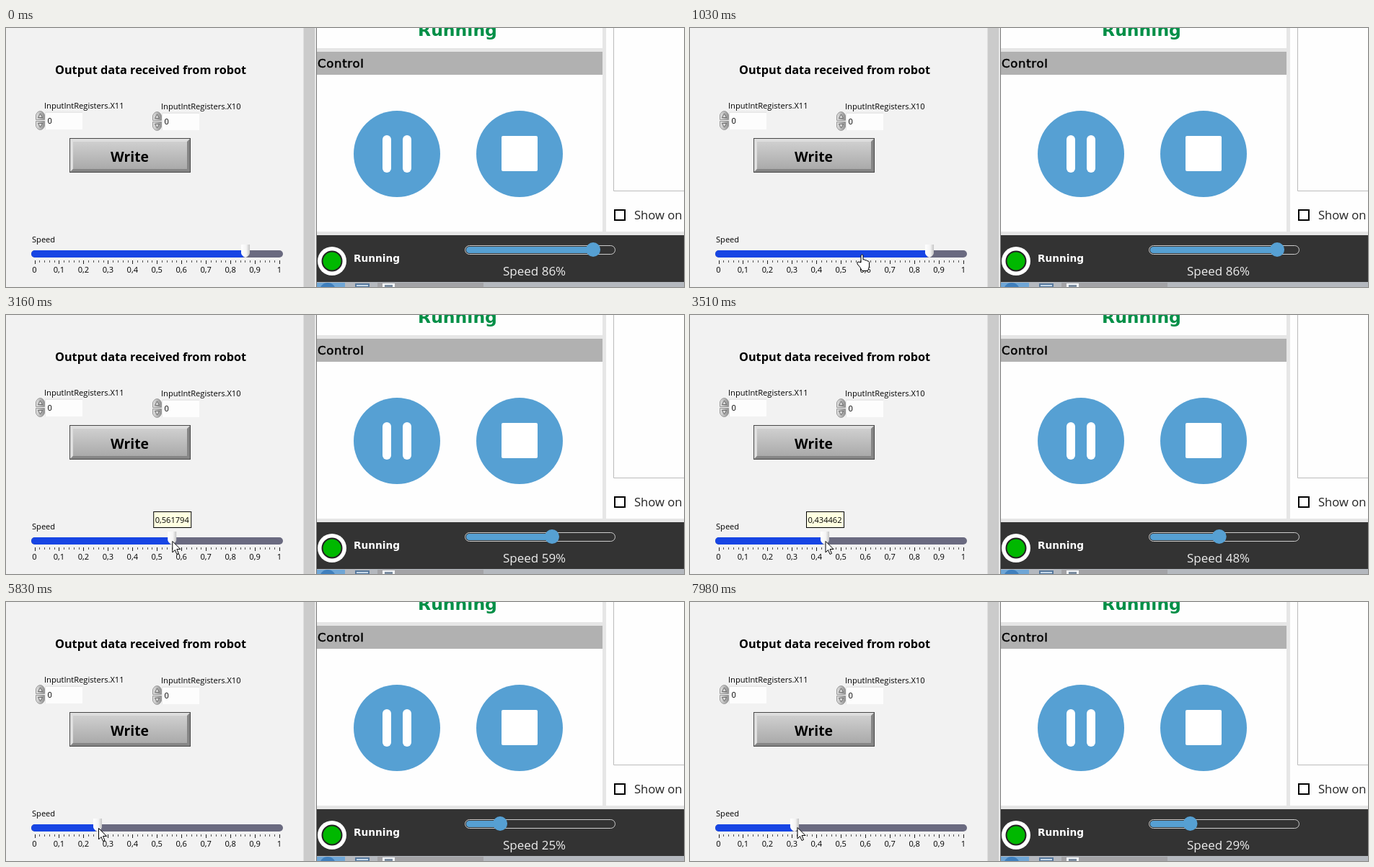
An HTML page for the animation above (8000 ms loop, 940 px wide and 360 px high).

```html
<!DOCTYPE html>
<html lang="en">
<head>
<meta charset="utf-8">
<title>Speed slider</title>
<style>
html, body { margin: 0; width: 100%; height: 100%; overflow: hidden; background: #f2f2f2; }
svg { display: block; }
text { font-family: "Open Sans", "Noto Sans", sans-serif; white-space: pre; }
.s { font-size: 11.1px; }
.b { font-weight: 700; }
.d { font-family: "DejaVu Sans", sans-serif; }
.m { text-anchor: middle; }
</style>
</head>
<body>
<svg width="940" height="360" viewBox="0 0 940 360">
<defs>
  <linearGradient id="btn" x2="0" y2="1">
    <stop stop-color="#cfcfcf"/><stop offset="1" stop-color="#aaa"/>
  </linearGradient>
  <linearGradient id="spin">
    <stop stop-color="#e4e4e4"/><stop offset="1" stop-color="#8e8e8e"/>
  </linearGradient>
  <linearGradient id="cap">
    <stop stop-color="#fff"/><stop offset=".6" stop-color="#f4f4f4"/><stop offset="1" stop-color="#c4c4c4"/>
  </linearGradient>
  <g id="field">
    <path d="M55 141V117H106" fill="none" stroke="#e0e0e0"/>
    <rect x="55" y="118" width="51" height="23" fill="#fdfdfd"/>
    <path d="M41.5 127.5V121Q43 116 47.500 115.500Q52 116 53.500 121V127.500ZM41.500 129.500V136Q43 141 47.500 141.500Q52 141 53.500 136V129.500Z" fill="url(#spin)" stroke="#999"/>
    <path d="M44.500 124.500L47.500 119L50.500 124.500ZM44.500 132.500L47.500 138L50.500 132.500Z" fill="#ddd" stroke="#555" stroke-width=".8"/>
    <text class="s" x="57.500" y="133">0</text>
  </g>
</defs>

<!-- left panel -->
<rect width="413" height="360" fill="#f2f2f2"/>
<text class="b" x="68" y="64" font-size="16.25">Output data received from robot</text>
<text class="s" x="53" y="112">InputIntRegisters.X11</text>
<text class="s" x="215" y="113">InputIntRegisters.X10</text>
<use href="#field"/>
<use href="#field" x="162" y="1"/>
<rect x="88.500" y="153.500" width="167" height="47" fill="url(#btn)" stroke="#484848"/>
<path d="M89 200V154H255L251 158H93V196Z" fill="#dedede"/>
<path d="M255 154V200H89L93 196H251V158Z" fill="#858585"/>
<rect x="93" y="158" width="158" height="38" fill="url(#btn)"/>
<text class="b m" x="171.500" y="186" font-size="19.300">Write</text>
<text class="s" x="36" y="298">Speed</text>
<rect x="35" y="309" width="349" height="10" rx="5" fill="#6a6a80"/>
<rect id="fill" x="35" y="309" height="10" rx="5" fill="#1745e4"/>
<g id="scale"></g>
<path id="knob" d="M-6 301H6V313Q5 317 0 319Q-5 317 -6 313Z" fill="url(#cap)"/>

<!-- right panel -->
<rect x="412.500" width="16" height="360" fill="#cbcbcb"/>
<rect x="428.500" width="1.500" height="360" fill="#eee"/>
<rect x="430" width="1" height="360" fill="#777"/>
<rect x="431" width="509" height="288" fill="#e6e6e6"/>
<path d="M431 0H827V28H431ZM431 65H827V283H431ZM832 0H940V283H832Z" fill="#fefefe"/>
<rect x="431" y="33" width="396" height="32" fill="#b1b1b1"/>
<text class="b d m" x="626" y="11" font-size="23.500" fill="#008f47">Running</text>
<text class="d" x="432" y="55" font-size="16.500" stroke="#000" stroke-width=".5" letter-spacing=".7">Control</text>
<g fill="#56a0d3"><circle cx="542" cy="175" r="60"/><circle cx="712" cy="175" r="60"/></g>
<g fill="#fff">
  <rect x="522" y="149" width="12" height="52" rx="6"/>
  <rect x="550" y="149" width="12" height="52" rx="6"/>
  <rect x="687" y="150" width="50" height="49" rx="2"/>
</g>
<path d="M842.500 0V226.500H940" fill="none" stroke="#bbb"/>
<rect x="844" y="253" width="14" height="14" fill="#fff" stroke="#000" stroke-width="2"/>
<text x="871" y="266" font-size="16.600" fill="#222">Show on</text>
<rect x="431" y="288" width="509" height="65" fill="#333"/>
<circle cx="452" cy="324" r="20" fill="#fff"/>
<circle cx="452" cy="324" r="13.500" fill="#00b800" stroke="#222" stroke-width="2"/>
<text class="b d" x="482" y="325" font-size="13.700" fill="#fff">Running</text>
<rect x="636.500" y="302.500" width="208" height="12" rx="6" fill="#333" stroke="#ccc"/>
<rect id="bar" x="638" y="304" height="9" rx="4.500" fill="#56a0d3"/>
<circle id="dot" cy="308" r="10" fill="#56a0d3"/>
<text id="percent" x="689" y="344" font-size="17" fill="#eee"></text>

<!-- taskbar -->
<rect x="431" y="353" width="509" height="7" fill="#b4b8be"/>
<rect x="431" y="354" width="39" height="6" fill="#6fa6d6"/>
<circle cx="446" cy="365" r="11" fill="#3f7fbd"/>
<rect x="484" y="355" width="20" height="5" fill="#56789c"/>
<rect x="486" y="357" width="16" height="2" fill="#c5d8ea"/>
<rect x="515" y="354" width="147" height="6" fill="#a3a3a6"/>
<rect x="522" y="355" width="17" height="5" fill="#f2f5f8"/>
<rect x="525" y="357" width="11" height="3" fill="#7c8da0"/>

<!-- overlays -->
<g id="tip">
  <rect x="-25.500" y="273.500" width="52" height="22" fill="#ffffe1" stroke="#000"/>
  <text class="s m" id="value" y="289"></text>
</g>
<path id="arrow" d="M.5 .5V16L4 12.500L6.500 18.500L9 17.500L6.500 11.500H11.500Z" fill="#fff" stroke="#000"/>
<path id="hand" d="M6 12V2Q7.500 -.5 9 2V8Q11 7 12 9Q14 8 15 10Q17 9.500 17.500 11.500V17Q17 20 15.500 23.500H7.500Q5 18 1 14Q0 11 3 11Z" fill="#fff" stroke="#000"/>
</svg>
<script>
const $ = id => document.getElementById(id);
const LOOP = 8000, STEP = 69;
const ZERO = 39.5, SPAN = 339.5;

let marks = "";
for (let i = 0; i <= 50; i++) {
  const x = ZERO + SPAN * i / 50, major = i % 5 === 0;
  marks += `<path d="M${Math.round(x) + .5} 323v${major ? 5 : 3}" stroke="${major ? "#222" : "#555"}"/>`;
  if (major) marks += `<text class="s m" x="${x}" y="340">${String(i / 50).replace(".", ",")}</text>`;
}
$("scale").innerHTML = marks;

// The picture refreshes in steps counted from the start of each movement.
const starts = [0, 330, 1300, 1700, 1900, 2300, 3160, 3770, 3840, 4960, 5370, 7150, 7980];
function snap(t) {
  const s = starts.filter(a => a <= t).pop();
  return s + Math.floor((t - s) / STEP) * STEP;
}

// Keys are [time, value]; two keys at one time make a jump.
function track(t, keys) {
  let [t0, v0] = keys[0];
  for (const [t1, v1] of keys) {
    if (t < t1) return t0 === t1 ? v0 : v0 + (v1 - v0) * Math.max(0, (t - t0) / (t1 - t0));
    [t0, v0] = [t1, v1];
  }
  return v0;
}

const knobKeys = [[0, 332], [1900, 332], [1900, 239], [3090, 239], [3505, 187],
  [5098, 187], [5098, 127], [7150, 127], [7909, 143], [7980, 143], [7980, 145]];
const arrowKeys = [[1300, 237], [1700, 237], [1700, 239], [3090, 239], [3505, 187.5],
  [4960, 187.5], [4960, 154.5], [5098, 128], [7150, 128], [7150, 130.5], [7909, 146], [7980, 146], [7980, 148.5]];
const speedKeys = [[0, 86], [2300, 86], [2300, 59], [3160, 59], [3505, 48], [3770, 48], [3770, 43],
  [5098, 43], [5370, 25], [7357, 25], [7909, 29]];
const tips = [[3160, 3840], [5098, 5370], [7219, 7640]];

const move = (id, x, y) => $(id).setAttribute("transform", `translate(${x} ${y})`);
const show = (id, on) => $(id).setAttribute("visibility", on ? "visible" : "hidden");

function draw(now) {
  const t = snap(now % LOOP);
  const x = track(t, knobKeys);
  move("knob", x, 0);
  $("fill").setAttribute("width", x - 35);

  show("tip", tips.some(([a, b]) => t >= a && t < b));
  move("tip", x, 0);
  $("value").textContent = ((x - ZERO) / SPAN).toFixed(6).replace(".", ",");

  const speed = Math.round(track(t, speedKeys));
  const dot = 632.2 + 2.115 * speed;
  $("dot").setAttribute("cx", dot);
  $("bar").setAttribute("width", dot - 638);
  $("percent").textContent = `Speed ${speed}%`;

  show("hand", t >= 330 && t < 1300);
  move("hand", track(t, [[330, 359], [675, 312], [1020, 231]]), track(t, [[330, 344], [675, 311.5], [1020, 314]]));
  show("arrow", t >= 1300);
  move("arrow", track(t, arrowKeys), track(t, [[7150, 314], [7980, 313]]));
}

function frame(now) {
  draw(now);
  requestAnimationFrame(frame);
}
draw(0);
requestAnimationFrame(frame);
</script>
</body>
</html>
```
